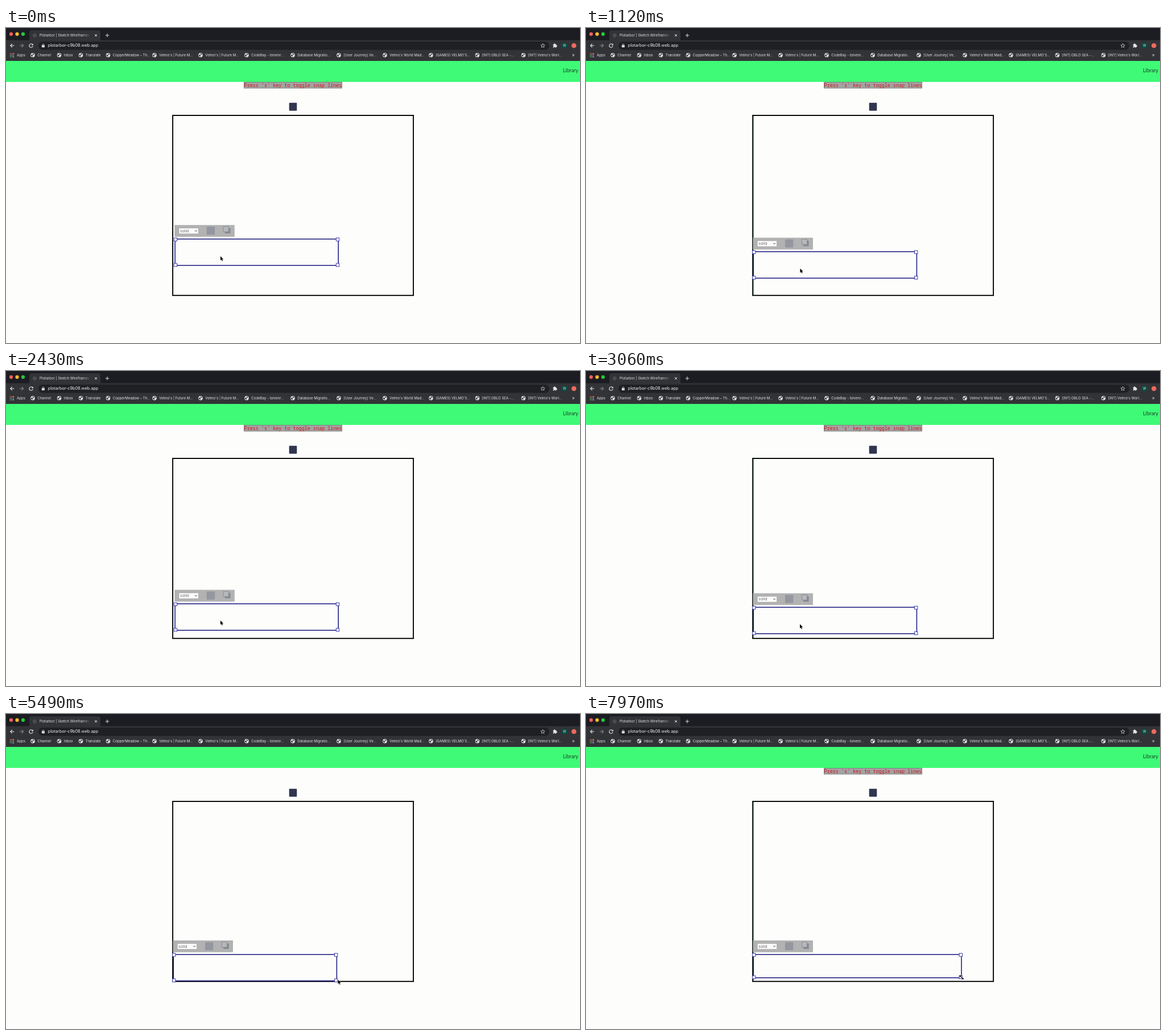
Recreate the animation shown at these times as an HTML page with a canvas. Size 1009 by 555 pixels, loop 7990 ms.

```html
<!DOCTYPE html>
<html lang="en">
<head>
<meta charset="utf-8">
<title>Wireframe editor</title>
<style>
html, body { margin: 0; width: 100%; height: 100%; overflow: hidden; background: #fdfdfc; }
#stage { position: absolute; left: 0; top: 0; width: 1009px; height: 555px; overflow: hidden; }
canvas { position: absolute; left: 0; top: 0; width: 1009px; height: 555px; }
span { position: absolute; white-space: pre; line-height: 12px; font-family: Inter, Roboto, sans-serif; }
.tab { width: 91px; overflow: hidden; -webkit-mask-image: linear-gradient(90deg, #000 82%, transparent); mask-image: linear-gradient(90deg, #000 82%, transparent); }
.lib { font-family: Lato, "Open Sans", sans-serif; }
.hint { font-family: "Noto Sans Mono", "DejaVu Sans Mono", monospace; }
</style>
</head>
<body>
<div id="stage"><canvas id="view"></canvas></div>
<script>
const W = 1009, H = 555, LOOP = 7990;
const stage = document.getElementById('stage');
const view = document.getElementById('view');
const dpr = window.devicePixelRatio || 1;
view.width = W * dpr;
view.height = H * dpr;
const c = view.getContext('2d');
c.scale(dpr, dpr);

// Cursor path: time, x, y
const path = [
  [0, 377, 402], [580, 375, 416], [1710, 378, 432], [3060, 376, 446],
  [3600, 375.5, 452], [3950, 376, 452], [4330, 403, 451], [5070, 566, 464],
  [5490, 583.5, 468], [6000, 581, 470], [6300, 581, 470.5], [7000, 612, 471],
  [7690, 648, 470], [7970, 660, 464], [7990, 660, 464]
];
// Top edge of the box: time, y
const fall = [[0, 371.8], [580, 385.8], [1710, 403.3], [3060, 416.3], [3600, 423.7]];
const DROP = 3950, AIM = 5950, GRAB = 6300;

function at(keys, t, col) {
  let i = 1;
  while (i < keys.length - 1 && keys[i][0] < t) i++;
  const a = keys[i - 1], b = keys[i];
  const k = Math.min(1, Math.max(0, (t - a[0]) / (b[0] - a[0])));
  return a[col] + (b[col] - a[col]) * k;
}

// y is the middle of the line
function text(str, x, y, size, color, cls) {
  const s = document.createElement('span');
  s.textContent = str;
  if (cls) s.className = cls;
  s.style.cssText = `left:${x}px;top:${y - 6}px;font-size:${size}px;color:${color}`;
  stage.append(s);
  return s;
}

function rect(x, y, w, h, fill) {
  c.fillStyle = fill;
  c.fillRect(x, y, w, h);
}

function round(x, y, w, h, r, fill) {
  c.fillStyle = fill;
  c.beginPath();
  c.roundRect(x, y, w, h, r);
  c.fill();
}

function dot(x, y, r, fill) {
  c.fillStyle = fill;
  c.beginPath();
  c.arc(x, y, r, 0, Math.PI * 2);
  c.fill();
}

function frame(x, y, w, h, color, width) {
  c.strokeStyle = color;
  c.lineWidth = width;
  c.strokeRect(x, y, w, h);
}

function line(pts, color, width) {
  c.strokeStyle = color;
  c.lineWidth = width;
  c.beginPath();
  pts.forEach(([x, y], i) => i ? c.lineTo(x, y) : c.moveTo(x, y));
  c.stroke();
}

function poly(pts, fill, edge) {
  c.beginPath();
  pts.forEach(([x, y]) => c.lineTo(x, y));
  c.closePath();
  if (edge) {
    c.strokeStyle = edge;
    c.lineWidth = 1;
    c.stroke();
  }
  c.fillStyle = fill;
  c.fill();
}

const marks = [
  ['Channel', 47], ['Inbox', 93.5], ['Translate', 131.5], ['CopperMeadow – Th...', 179.5],
  ["Velmo's | Future M...", 261], ["Velmo's | Future M...", 342], ['CodeBay - tolvenr...', 423],
  ['Database Migratio...', 504], ['[User Journey] Ve...', 585], ["Velmo's World Mad...", 666],
  ["(GAMES) VELMO'S...", 747], ['[INT] OBLO SEA -...', 828.5], ["[INT] Velmo's Worl...", 909.5]
];

function globe(x, y) {
  dot(x, y, 3.8, '#e6e7e9');
  poly([[x - 3, y - 1], [x - 1, y - .6], [x + .4, y + .8], [x - .4, y + 2.8], [x - 2, y + 2], [x - 3, y + .6]], '#393a3e');
  poly([[x - .6, y - 2.9], [x + 1.8, y - 2.6], [x + 2.8, y - .6], [x + .8, y - .2], [x + .6, y - 1.4], [x - .6, y - 1.6]], '#393a3e');
}

function browser() {
  rect(0, 0, W, 58, '#323337');
  rect(0, 0, W, 21.5, '#1c1d23');
  ['#ff5f57', '#febc2e', '#28c840'].forEach((color, i) => dot(9 + i * 10.5, 10.7, 3.1, color));
  round(41, 4, 125, 18, [4, 4, 0, 0], '#323337');
  dot(50.3, 13, 3.6, '#4b4c4f');
  line([[156, 11], [160, 15]], '#e2e3e5', 1);
  line([[160, 11], [156, 15]], '#e2e3e5', 1);
  line([[174.8, 13], [181.2, 13]], '#dadbdd', 1);
  line([[178, 9.8], [178, 16.2]], '#dadbdd', 1);

  round(57, 24, 898, 14.5, 7.2, '#1f2024');
  line([[14.3, 31], [7.8, 31]], '#e6e7e9', 1.1);
  line([[10.9, 27.8], [7.8, 31], [10.9, 34.2]], '#e6e7e9', 1.1);
  line([[24.2, 31], [30.7, 31]], '#85868a', 1.1);
  line([[27.6, 27.8], [30.7, 31], [27.6, 34.2]], '#85868a', 1.1);
  c.strokeStyle = '#e6e7e9';
  c.lineWidth = 1.1;
  c.beginPath();
  c.arc(44.2, 31, 3.2, .3, 5.5);
  c.stroke();
  poly([[47.8, 27.4], [47.8, 30.6], [44.6, 30.6]], '#e6e7e9');

  rect(62.9, 30.1, 5, 4, '#dcdde0');
  c.strokeStyle = '#dcdde0';
  c.lineWidth = .9;
  c.beginPath();
  c.arc(65.4, 29.7, 1.5, Math.PI, 0);
  c.stroke();

  const star = [];
  for (let i = 0; i < 11; i++) {
    const r = i % 2 ? 1.7 : 3.8, a = i * Math.PI / 5 - Math.PI / 2;
    star.push([943.6 + r * Math.cos(a), 31.2 + r * Math.sin(a)]);
  }
  line(star, '#d5d6d9', .8);

  round(961.6, 28.8, 5.8, 5.8, .8, '#e6e7e9');
  dot(964.3, 28.5, 1.3, '#e6e7e9');
  dot(967.6, 31.7, 1.3, '#e6e7e9');
  dot(961.6, 31.8, 1.1, '#323337');
  dot(964.4, 34.6, 1.1, '#323337');
  dot(981.5, 31, 5.3, '#0c4a42');
  dot(998.3, 31, 4.3, '#ee6a5f');

  const tints = ['#e8584d', '#e8584d', '#f0b43c', '#3fa45c', '#4a88e0', '#e8584d', '#3fa45c', '#4a88e0', '#f0b43c'];
  tints.forEach((color, i) => rect(6.8 + i % 3 * 2.7, 44.4 + Math.floor(i / 3) * 2.7, 1.8, 1.8, color));
  marks.forEach(([, x]) => globe(x, 47.8));
}

function arrow(x, y) {
  const shape = [[0, 0], [0, 7.6], [1.7, 6], [2.9, 8.7], [4.1, 8.2], [2.9, 5.5], [5.2, 5.4]];
  poly(shape.map(([u, v]) => [x + u, y + v]), '#000', '#fff');
}

function resizer(x, y) {
  line([[x - 3, y - 3], [x + 3, y + 3]], '#fff', 2.4);
  line([[x - 2.5, y - 2.5], [x + 2.5, y + 2.5]], '#000', 1.3);
  poly([[x - 3.6, y - 3.6], [x - .4, y - 3.6], [x - 3.6, y - .4]], '#000');
  poly([[x + 3.6, y + 3.6], [x + .4, y + 3.6], [x + 3.6, y + .4]], '#000');
}

function tools(x, y) {
  rect(x, y, 105.5, 20.7, '#b2b2b2');
  rect(x + 7.7, y + 5.5, 34.2, 10, '#fbfbfb');
  frame(x + 7.7, y + 5.5, 34.2, 10, '#999', .5);
  line([[x + 35.8, y + 9.3], [x + 37.6, y + 11.3], [x + 39.4, y + 9.3]], '#444', 1);
  round(x + 56.5, y + 3, 14.3, 14.2, 1, '#9496a0');
  round(x + 88.5, y + 5.3, 9.7, 9.7, 1, '#858a94');
  round(x + 85.7, y + 2.6, 9.4, 9.4, 1, '#b7b8ba');
  frame(x + 85.9, y + 2.8, 9, 9, '#858a94', .9);
}

function box(x, y, r, b) {
  const ink = '#15157c';
  frame(x, y, r - x, b - y, ink, 1.5);
  for (const hx of [x + .9, r - 1.2]) {
    for (const hy of [y + .7, b - .8]) {
      rect(hx - 2.7, hy - 2.7, 5.4, 5.4, '#fff');
      frame(hx - 2.7, hy - 2.7, 5.4, 5.4, '#2d2da6', .9);
    }
  }
}

text('Plotarbor | Sketch Wireframes', 59, 12.7, 6.15, '#e4e5e7', 'tab');
text('plotarbor-c9b08.web.app', 73.7, 31, 7.3, '#f0f1f2');
text('W', 979.1, 31, 5.6, '#d5e4df');
text('Apps', 19, 47.8, 6.1, '#e4e5e7');
marks.forEach(([name, x]) => text(name, x + 8.3, 47.8, 6.1, '#e4e5e7'));
text('»', 995, 47.4, 8, '#e4e5e7');
text('Library', 979, 74.6, 8.8, '#173d26', 'lib');
const hint = text("Press 's' key to toggle snap lines", 418.6, 100.8, 8.43, '#d0131b', 'hint');
const solid = text('solid', 0, 6, 6.8, '#666');

function draw(t) {
  const mx = at(path, t, 1), my = at(path, t, 2);
  const sizing = t >= GRAB, busy = t < DROP || sizing;
  const snapped = t >= DROP || mx < 376.5;
  const x = snapped ? 294.3 : 297.1, y = at(fall, t, 1);
  const right = sizing ? Math.max(581.4, mx) : x + 287.1;
  const bottom = sizing ? Math.min(470.2, my + .7) : y + 46.5;

  rect(0, 0, W, H, '#fdfdfc');
  browser();
  rect(0, 58, W, 37, '#3ffa76');
  if (busy) {
    rect(418, 95, 173, 11.3, '#a3a3a3');
    frame(418.3, 95.3, 172.4, 10.7, '#6c6c6c', .6);
  }
  round(497.7, 131.8, 13.6, 14, 1, '#30364f');
  frame(293.1, 154, 423, 317.2, '#000', 1.9);
  if (snapped && busy && t > 820) rect(293.6, 155, 1, 315.3, '#15751f');
  tools(x - .8, y - 24.7);
  box(x, y, right, bottom);
  (t < AIM ? arrow : resizer)(mx, my);

  hint.style.visibility = busy ? 'visible' : 'hidden';
  solid.style.transform = `translate(${x + 9}px, ${y - 14.2 - 6}px)`;
}

const start = performance.now();
function tick() {
  draw((performance.now() - start) % LOOP);
  requestAnimationFrame(tick);
}
tick();
</script>
</body>
</html>
```
